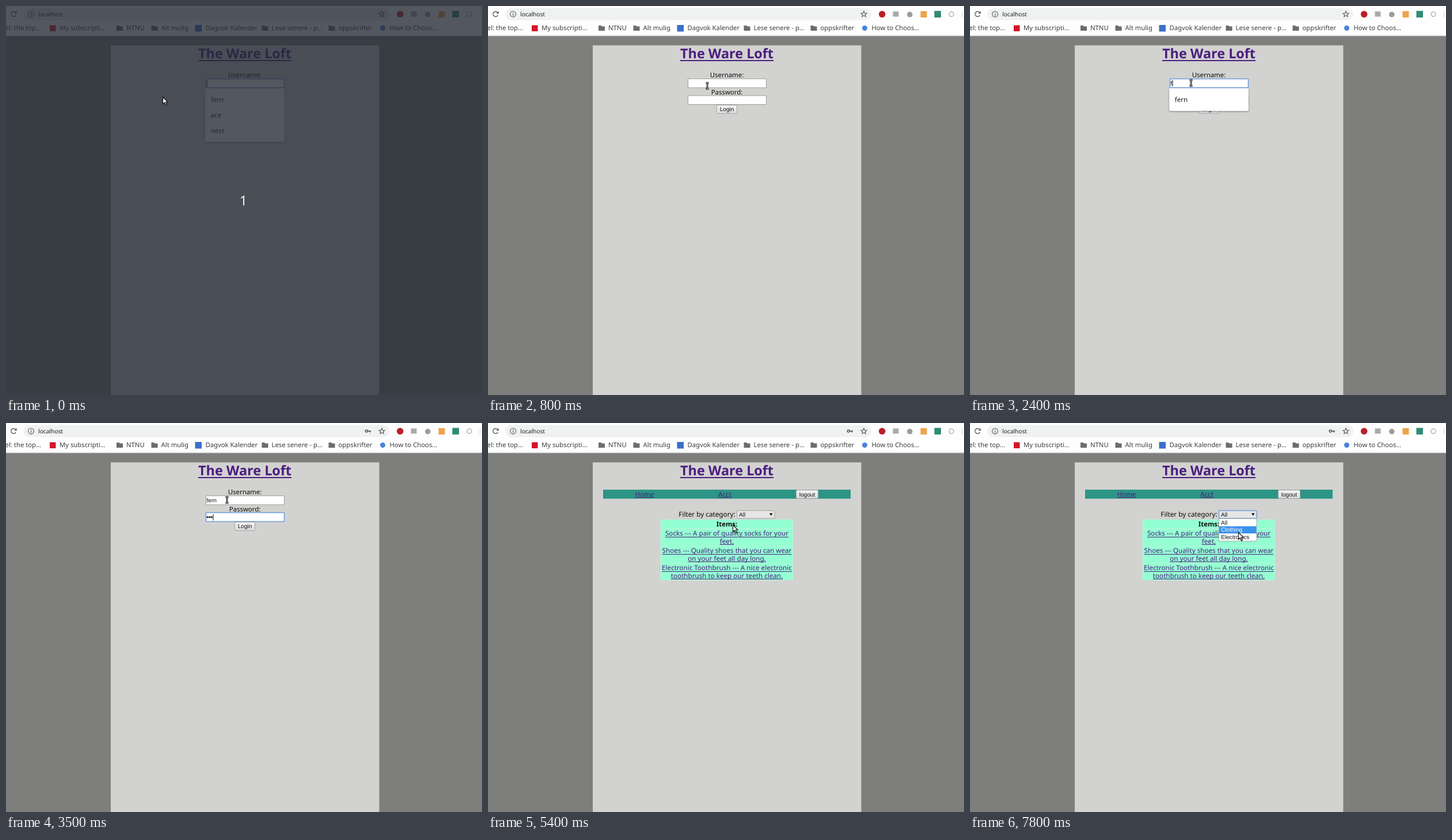
An HTML page with a canvas for the animation above (8 s loop, 827 by 677 pixels).

```html
<!DOCTYPE html>
<html lang="en">
<head>
<meta charset="utf-8">
<title>Shop login</title>
<style>
html, body { margin: 0; width: 100%; height: 100%; overflow: hidden; }
canvas { display: block; }
</style>
</head>
<body>
<canvas id="stage" width="827" height="677"></canvas>
<script>
const ctx = document.getElementById('stage').getContext('2d');
const LOOP = 8000, TICK = 100;
const UI = '"Noto Sans", sans-serif';
const FORM = '"Liberation Sans", Arial, sans-serif';
const VISITED = '#4b1d80', GREY = '#696c70', BLUE = '#6f9ddb';
const NAMES = ['fern', 'ace', 'nest'];
const OPTIONS = ['All', 'Clothing', 'Electronics'];

// Pointer path: time, x, y, shape taken from that time on.
const POINTER = [
  [0, 272, 158, 'arrow'], [100, 272, 158, 'arrow'], [400, 350, 137, 'arrow'],
  [500, 376, 129, 'beam'], [600, 376, 129, 'beam'], [800, 381, 139, 'beam'],
  [900, 432, 149, 'beam'], [1000, 488, 161, 'arrow'], [1100, 513, 166, 'arrow'],
  [1500, 513, 166, 'arrow'], [1600, 440, 146, 'beam'], [1700, 388, 136, 'beam'],
  [1800, 384, 134, 'beam'], [4000, 384, 134, 'beam'], [4100, 396, 141, 'beam'],
  [4200, 365, 147, 'beam'], [4300, 365, 147, 'beam'], [4400, 345, 83, 'arrow'],
  [4500, 492, 150, 'arrow'], [4600, 492, 150, 'arrow'], [4900, 433, 183, 'arrow'],
  [5100, 424, 180, 'arrow'], [5400, 425, 177, 'arrow'], [5600, 425, 177, 'arrow'],
  [5700, 419, 181, 'arrow'], [5800, 419, 181, 'arrow'], [5900, 415, 184, 'arrow'],
  [6200, 415, 184, 'arrow'], [6300, 414, 187, 'beam'], [6400, 391, 180, 'arrow'],
  [6500, 391, 180, 'arrow'], [6800, 465, 157, 'arrow'], [6900, 467, 160, 'arrow'],
  [7100, 509, 210, 'arrow'], [7200, 498, 199, 'arrow'], [7600, 498, 199, 'arrow'],
  [7700, 427, 161, 'arrow'], [7800, 466, 190, 'arrow']
];

// Stepped values: [time, value]
const TYPED = [[0, 0], [2400, 1], [2500, 2], [2600, 3], [2800, 4]];
const DOTS = [[0, 0], [3200, 1], [3400, 2], [3500, 3], [3700, 4]];
const POPUP = [[0, 1], [100, .73], [200, .3], [300, 0], [1700, .6], [1800, 1], [3000, .5], [3100, 0]];
const FOCUS = [[0, 'name'], [100, ''], [1700, 'name'], [3000, 'pass']];
const CARET = [[0, 1], [100, 0], [1700, 1], [2200, 0], [2400, 1], [4400, 0]];
const HOVER = [[0, 0], [7000, 1], [7100, 2], [7800, 1]];

const stepAt = (track, t) => track.filter(k => k[0] <= t).pop()[1];

function pointerAt(t) {
  const i = POINTER.findLastIndex(k => k[0] <= t);
  const a = POINTER[i], b = POINTER[i + 1] || a;
  const p = b === a ? 0 : (t - a[0]) / (b[0] - a[0]);
  return { x: a[1] + (b[1] - a[1]) * p, y: a[2] + (b[2] - a[2]) * p, shape: a[3] };
}

function rect(x, y, w, h, fill) {
  ctx.fillStyle = fill;
  ctx.fillRect(x, y, w, h);
}

function box(x, y, w, h, r, fill, stroke, line = 1) {
  ctx.beginPath();
  ctx.roundRect(x, y, w, h, r);
  if (fill) { ctx.fillStyle = fill; ctx.fill(); }
  if (stroke) { ctx.strokeStyle = stroke; ctx.lineWidth = line; ctx.stroke(); }
}

function circle(x, y, r, fill, stroke, line = 1) {
  ctx.beginPath();
  ctx.arc(x, y, r, 0, Math.PI * 2);
  if (fill) { ctx.fillStyle = fill; ctx.fill(); }
  if (stroke) { ctx.strokeStyle = stroke; ctx.lineWidth = line; ctx.stroke(); }
}

function polygon(points) {
  ctx.beginPath();
  points.forEach(([x, y]) => ctx.lineTo(x, y));
  ctx.closePath();
}

function text(s, x, y, font, color = '#111', align = 'left') {
  ctx.font = font;
  ctx.textAlign = align;
  ctx.fillStyle = color;
  ctx.fillText(s, x, y);
}

const label = (s, x, y, size = 11.65, weight = '') =>
  text(s, x, y, `${weight} ${size}px ${UI}`, '#0c0c0c', 'center');

function link(s, x, y, size = 11.65, weight = '', gap = 1.2, line = 1) {
  text(s, x, y, `${weight} ${size}px ${UI}`, VISITED, 'center');
  const w = ctx.measureText(s).width;
  rect(x - w / 2, Math.round(y + gap), w, line, VISITED);
}

function button(s, x, y, w, h) {
  const shade = ctx.createLinearGradient(0, y, 0, y + h);
  shade.addColorStop(0, '#f5f5f5');
  shade.addColorStop(1, '#dcdcdc');
  box(x + .5, y + .5, w - 1, h - 1, 1.5, shade, '#a3a3a3');
  text(s, x + w / 2, y + h / 2 + 3.6, `10.1px ${FORM}`, '#111', 'center');
}

function field(y, focused) {
  box(347.5, y, 136, 15.5, focused ? 1 : 0, '#fff', focused ? BLUE : '#9b9b9b', focused ? 1.6 : 1);
}

function folder(x) {
  ctx.fillStyle = GREY;
  polygon([[x, 34], [x + 4.5, 34], [x + 6, 35.5], [x + 11, 35.5], [x + 11, 43], [x, 43]]);
  ctx.fill();
}

function star(cx, cy) {
  polygon(Array.from({ length: 10 }, (_, i) => {
    const r = i % 2 ? 2.3 : 5.3, a = i * Math.PI / 5 - Math.PI / 2;
    return [cx + r * Math.cos(a), cy + r * Math.sin(a)];
  }));
  ctx.strokeStyle = '#55585c';
  ctx.lineWidth = 1.1;
  ctx.stroke();
}

function keyIcon() {
  circle(626.3, 14, 2, null, '#55585c', 1.6);
  rect(628, 13.2, 6, 1.7, '#55585c');
  rect(631.5, 14, 1.7, 2.5, '#55585c');
}

function browser(hasKey) {
  rect(0, 0, 827, 52, '#fefefe');
  rect(0, 51.5, 827, 1, '#c4c4c3');
  box(30, 4, 636, 20.5, 10.2, '#eff2f0');

  ctx.beginPath();
  ctx.arc(13.2, 14, 4.4, .5, Math.PI * 1.8);
  ctx.strokeStyle = '#505357';
  ctx.lineWidth = 1.4;
  ctx.stroke();
  ctx.fillStyle = '#505357';
  polygon([[18.6, 9], [18.6, 13.2], [14.3, 13.2]]);
  ctx.fill();

  circle(43.5, 14.2, 4.9, null, '#55585c', 1.1);
  rect(43, 13.4, 1.2, 3.6, '#55585c');
  rect(43, 11.3, 1.2, 1.2, '#55585c');
  text('localhost', 56, 18, `10.2px ${UI}`, '#222');
  if (hasKey) keyIcon();
  star(653, 14.3);

  circle(684.7, 14.3, 5.8, '#b8202a');
  rect(703.5, 9.5, 10, 9, '#aaaaaa');
  circle(732.8, 14.8, 4.8, '#9c9c9c');
  rect(751.5, 9, 11, 11, '#eda349');
  rect(775.5, 8.5, 11.5, 11.5, '#318b74');
  circle(805, 14.3, 4, null, '#b3b3b3', 1.5);
  rect(823, 9, 1, 11, '#d5d5d5');

  const mark = (s, x, align) => text(s, x, 42, `11.3px ${UI}`, '#3b3d40', align);
  mark('nel: the top…', 61, 'right');
  rect(76, 33.5, 10.5, 10.5, '#d3152b');
  mark('My subscripti…', 93);
  mark('NTNU', 209);
  mark('Alt mulig', 269.5);
  rect(328.5, 33, 11.5, 11.5, '#3c6fc8');
  mark('Dagvok Kalender', 346.5);
  mark('Lese senere - p…', 461.5);
  mark('oppskrifter', 577.5);
  circle(654.5, 38.5, 4.5, '#4a82dc');
  mark('How to Choos…', 666.5);
  [192, 252.5, 444.5, 560.5].forEach(folder);
}

// Shadow outside the box only, so that a translucent box stays white.
function outerShadow(x, y, w, h) {
  ctx.save();
  ctx.beginPath();
  ctx.rect(0, 0, 827, 677);
  ctx.roundRect(x, y, w, h, 2);
  ctx.clip('evenodd');
  ctx.shadowColor = 'rgba(0,0,0,.5)';
  ctx.shadowBlur = 3;
  ctx.shadowOffsetY = 1;
  box(x, y, w, h, 2, '#fff');
  ctx.restore();
}

function popup(count, alpha) {
  if (!alpha) return;
  const inset = alpha < 1 ? .8 : 0;
  const area = [346.3 + inset, 143, 137.4 - 2 * inset, (count === 1 ? 39.5 : 93.5) - inset];
  ctx.save();
  ctx.globalAlpha = alpha;
  outerShadow(...area);
  box(...area, 2, '#fff');
  NAMES.slice(0, count).forEach((s, i) =>
    text(s, 355.7 + inset, 167 + 27 * i, `11.6px ${UI}`, '#1c1c1c'));
  ctx.restore();
}

function loginPage(t) {
  const focus = stepAt(FOCUS, t), typed = stepAt(TYPED, t), dots = stepAt(DOTS, t);
  const font = `10.1px ${FORM}`;
  const entry = NAMES[0].slice(0, typed);
  label('Username:', 415, 123.7, 11.4);
  label('Password:', 415, 153.5, 11.4);
  field(126.7, focus === 'name');
  field(156, focus === 'pass');
  button('Login', 397, 172, 36, 15.5);
  text(entry, 348.5, 138, font);
  for (let i = 0; i < dots; i++) circle(350.2 + 3.6 * i, 163.8, 1.6, '#111');
  if (stepAt(CARET, t)) {
    ctx.font = font;
    if (focus === 'name') rect(348.7 + ctx.measureText(entry).width, 129, 1, 11, '#111');
    else rect(348.7 + 3.6 * dots, 158.5, 1, 11, '#111');
  }
  popup(typed ? 1 : 3, stepAt(POPUP, t));
}

function itemRow(y, h, lines) {
  rect(300.5, y, 228.5, h, '#94ffd2');
  lines.forEach((s, i) => link(s, 415, y + 11.3 + 13.7 * i));
}

function shopPage(t) {
  const open = t >= 6900;
  rect(200, 116, 430, 15.7, '#2c9586');
  link('Home', 272, 127.5, 11.4);
  link('Acct', 411.5, 127.5);
  button('logout', 535, 116.2, 39, 15.5);
  label('Filter by category:', 380.5, 162.5, 11.75);

  rect(299.5, 168, 230.5, 105.5, '#b9f3da');
  rect(300.5, 168.5, 228.5, 15, '#94ffd2');
  label('Items:', 415, 179.7, 11.5, 'bold');
  itemRow(185, 29, ['Socks --- A pair of quality socks for your', 'feet.']);
  itemRow(215, 29, ['Shoes --- Quality shoes that you can wear', 'on your feet all day long.']);
  itemRow(245, 28, ['Electronic Toothbrush --- A nice electronic', 'toothbrush to keep our teeth clean.']);

  box(432.5, 152.5, 65.5, 13.5, 1.5, '#e6e6e6', open ? BLUE : '#a3a3a3', open ? 1.4 : 1);
  text('All', 436, 162.7, `10.1px ${FORM}`);
  ctx.fillStyle = '#111';
  polygon([[489, 157], [494.6, 157], [491.8, 161.6]]);
  ctx.fill();

  if (!open) return;
  box(432.5, 166.5, 65.5, 39, 0, '#fff', '#a8a8a8');
  const hover = stepAt(HOVER, t);
  OPTIONS.forEach((s, i) => {
    const y = 167.2 + 12.5 * i;
    if (i === hover) rect(433, y, 64.5, 12.5, '#3b92ef');
    text(s, 436, y + 9.3, `10.1px ${FORM}`, i === hover ? '#fff' : '#111');
  });
}

function pointer({ x, y, shape }) {
  ctx.save();
  ctx.translate(x, y);
  if (shape === 'arrow') {
    polygon([[.5, .5], [.5, 12.6], [3.2, 10.1], [5.3, 14.8], [7.3, 13.9], [5.2, 9.3], [8.9, 9]]);
    ctx.fillStyle = '#fff';
    ctx.strokeStyle = '#111';
    ctx.lineWidth = 1.2;
    ctx.fill();
    ctx.stroke();
  } else {
    for (const [color, line] of [['#111', 2.8], ['#ddd', .8]]) {
      ctx.beginPath();
      ctx.moveTo(-2.5, -5); ctx.lineTo(2.5, -5);
      ctx.moveTo(0, -5); ctx.lineTo(0, 5);
      ctx.moveTo(-2.5, 5); ctx.lineTo(2.5, 5);
      ctx.strokeStyle = color;
      ctx.lineWidth = line;
      ctx.stroke();
    }
  }
  ctx.restore();
}

function draw(now) {
  const t = Math.floor(now % LOOP / TICK) * TICK;
  ctx.textRendering = 'geometricPrecision';
  rect(0, 0, 827, 677, '#7e7e7c');
  rect(182, 68.5, 466.5, 609, '#d2d2d0');
  browser(t >= 3200);
  link('The Ware Loft', 415, 91.3, 23.4, 'bold', 2.5, 2);
  if (t < 5200) loginPage(t); else shopPage(t);
  if (t < 100) {
    rect(0, 0, 827, 677, 'rgba(38,42,52,.79)');
    text('1', 412.5, 347, `23.5px ${UI}`, '#f8f4de', 'center');
  }
  pointer(pointerAt(t));
}

const start = performance.now();
function tick() {
  draw(performance.now() - start);
  requestAnimationFrame(tick);
}
tick();
</script>
</body>
</html>
```
